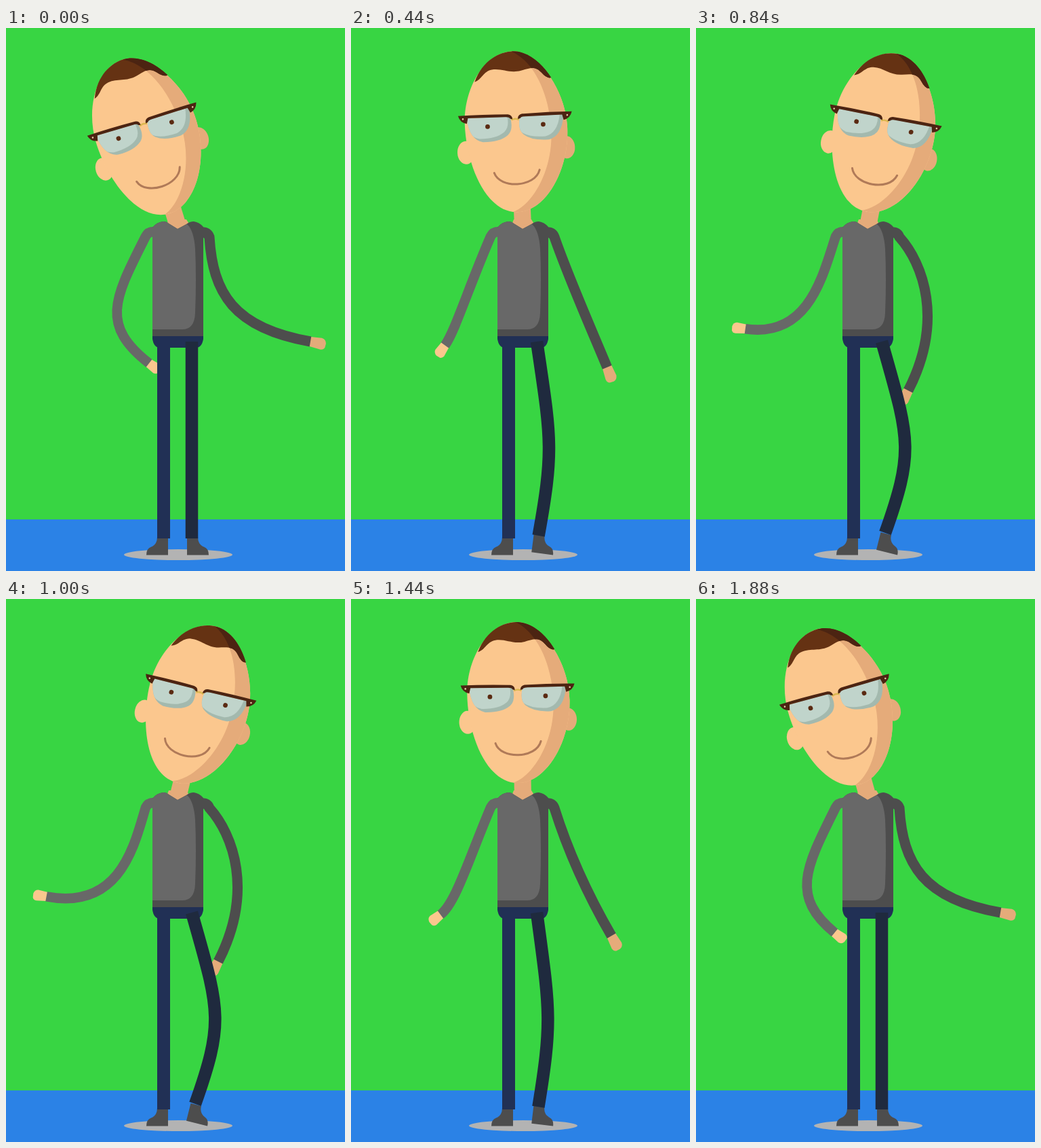
An HTML page that plays this animation: 500 by 800 pixels, repeating every 1920 ms.

```html
<!DOCTYPE html>
<html lang="en">
<head>
<meta charset="utf-8">
<title>Swinging man</title>
<style>
  html, body { margin: 0; height: 100%; overflow: hidden; background: #38d543; }
  svg { display: block; width: 100vw; height: 100vh; }
  .limb { fill: none; }
  .skin { fill: #fbc78e; }
  .tan { fill: #e5ab7a; }
  .light { fill: #686868; }
  .dark { fill: #4d4d4d; }
  .brown { fill: #4c2412; }
  .navy { fill: #213055; }
</style>
</head>
<body>
<svg viewBox="0 0 500 800">
  <defs>
    <path id="face" d="M247.5 34C287 34 325 95 325 150C325 213 288 271 247 271C200 271 174 198 174 140C174 85 208 34 247.5 34Z"/>
    <path id="hair" d="M191 77C204 45 230 34 247.5 34C272 34 292 54 304 75Q298 77 290 67C281 56 272 60 260 63C243 67 232 58 217 60C204 62 202 74 191 77Z"/>
    <path id="shade" d="M247 34C280 50 301 100 301 155C301 210 270 262 238 271H345V20H247Z"/>
    <path id="lens" d="M177 130H241Q246 149 237 157Q225 167 200 166Q180 162 177 130Z"/>
    <path id="lensR" d="M320 130H256Q251 149 260 157Q272 167 297 166Q317 162 320 130Z"/>
    <g id="brow">
      <path class="brown" d="M164.5 126Q200 125 238 126.5Q244.5 127.5 244.5 134L241 133Q240 130.5 234 130.5L179 130L177 138Q167 136 164.5 126Z"/>
      <circle cx="171.5" cy="131" r="1.3" fill="#e8c9a8"/>
      <circle cx="207.5" cy="143.4" r="3.4" fill="#5a2a12"/>
    </g>
    <path id="shoe" class="dark" d="M267 776.5V750H283Q283 761 292 764.5Q299 767 299 776.5Z"/>
    <path id="hand" d="M-1 -7L15 -8Q21 -7 22 -1L21.5 5Q20 9 15 9L-1 7Z"/>
    <clipPath id="inFace"><use href="#face"/></clipPath>
    <clipPath id="inHair"><use href="#hair"/></clipPath>
    <clipPath id="inLens"><use href="#lens"/></clipPath>
    <clipPath id="inLensR"><use href="#lensR"/></clipPath>
  </defs>

  <rect width="500" height="800" fill="#38d543"/>
  <rect y="724" width="500" height="76" fill="#2b82e6"/>
  <ellipse cx="254" cy="776" rx="80" ry="8" fill="#b3b3b3"/>

  <use href="#hand" id="handL" class="skin"/>
  <path id="armL" class="limb" stroke="#686868" stroke-width="14.5"/>
  <use href="#hand" id="handR" class="tan"/>
  <path id="armR" class="limb" stroke="#4d4d4d" stroke-width="15"/>

  <use href="#shoe" transform="matrix(-1 0 0 1 506 0)"/>
  <use href="#shoe" id="foot"/>
  <path class="navy" d="M216 453H291V458Q289 471 280 471H227Q218 471 216 458Z"/>
  <rect class="navy" x="223" y="465" width="19" height="287"/>
  <path id="leg" class="limb" stroke="#1f2a3e" stroke-width="18.5"/>

  <path class="tan" d="M240 282L237 290L253 299L271 290L266 282Z"/>
  <g id="head">
    <rect class="tan" x="241" y="255" width="25" height="35"/>
    <ellipse class="skin" cx="174" cy="180.5" rx="12.5" ry="17"/>
    <ellipse class="tan" cx="323" cy="178.5" rx="12" ry="16.5"/>
    <use href="#face" class="skin"/>
    <use href="#shade" class="tan" clip-path="url(#inFace)"/>
    <use href="#hair" fill="#653213"/>
    <use href="#shade" class="brown" clip-path="url(#inHair)"/>
    <g fill="#a3b9ae">
      <use href="#lens"/>
      <use href="#lensR"/>
    </g>
    <g fill="#c0d4cb">
      <g clip-path="url(#inLens)"><use href="#lens" x="-5" y="-5"/></g>
      <g clip-path="url(#inLensR)"><use href="#lensR" x="-5" y="-5"/></g>
    </g>
    <path d="M243 135Q248.5 132 254 135" fill="none" stroke="#dcb851" stroke-width="2.5"/>
    <use href="#brow"/>
    <use href="#brow" transform="matrix(-1 0 0 1 497 0)"/>
    <path d="M214.5 212C222 236 274 236 281.5 210" fill="none" stroke="#b07a58" stroke-width="3" stroke-linecap="round"/>
  </g>

  <path class="dark" d="M216 294Q222 286 232 285Q237 285 240 288L253 296L266 289Q271 285 277 285Q285 286 291 293V454H216Z"/>
  <path class="light" d="M216 294Q222 286 232 285Q237 285 240 288L253 296L267 289Q277 298 279 325Q281 370 279 420Q278 444 260 444H216Z"/>
</svg>

<script>
const LOOP = 1920, STEP = 40;
const $ = id => document.getElementById(id);
const set = (id, name, value) => $(id).setAttribute(name, value);
const mix = (a, b, k) => a.map((v, i) => v + (b[i] - v) * k);

// Shoulder stub, then handle, handle and wrist at both ends of the swing
const arms = {
  L: {
    shoulder: 'M220 300Q210 299 206 307', handScale: '.9 -.95',
    from: [160, 398, 138, 437, 211, 494], to: [191, 359, 171, 460, 53, 436]
  },
  R: {
    shoulder: 'M287 301Q297 300 300 308', handScale: '1.05 1',
    from: [305, 390, 335, 442, 449, 462], to: [338, 343, 369, 430, 300, 541]
  }
};

// Rises 0 to 1 over half, falls back, then rests
const swing = (t, half) => Math.max(0, 1 - Math.abs(t - half) / half);

function drawArm(side, k) {
  const { shoulder, handScale, from, to } = arms[side];
  const curve = mix(from, to, k);
  const [, , x, y, wristX, wristY] = curve;
  const angle = Math.atan2(wristY - y, wristX - x) * 180 / Math.PI;
  set('arm' + side, 'd', `${shoulder}C${curve}`);
  set('hand' + side, 'transform', `translate(${wristX} ${wristY}) rotate(${angle}) scale(${handScale})`);
}

function drawLeg(k) {
  const bulge = 38.4 * k;
  set('leg', 'd', `M274 462C${274 + 1.15 * bulge} 605 ${274 + 1.4 * bulge} 620 ${274 + 5.5 * k} ${752 - 8.8 * k}`);
  set('foot', 'transform', `translate(${-2 * k} 0) rotate(${15.5 * k} 299 776)`);
}

function draw(now) {
  const t = Math.floor(now % LOOP / STEP) * STEP;
  const slow = swing(t, 960), quick = swing(t, 920);
  set('head', 'transform', `rotate(${32 * slow - 17} 251.5 292)`);
  drawArm('L', slow);
  drawArm('R', quick);
  drawLeg(quick);
  requestAnimationFrame(draw);
}
draw(0);
</script>
</body>
</html>
```
